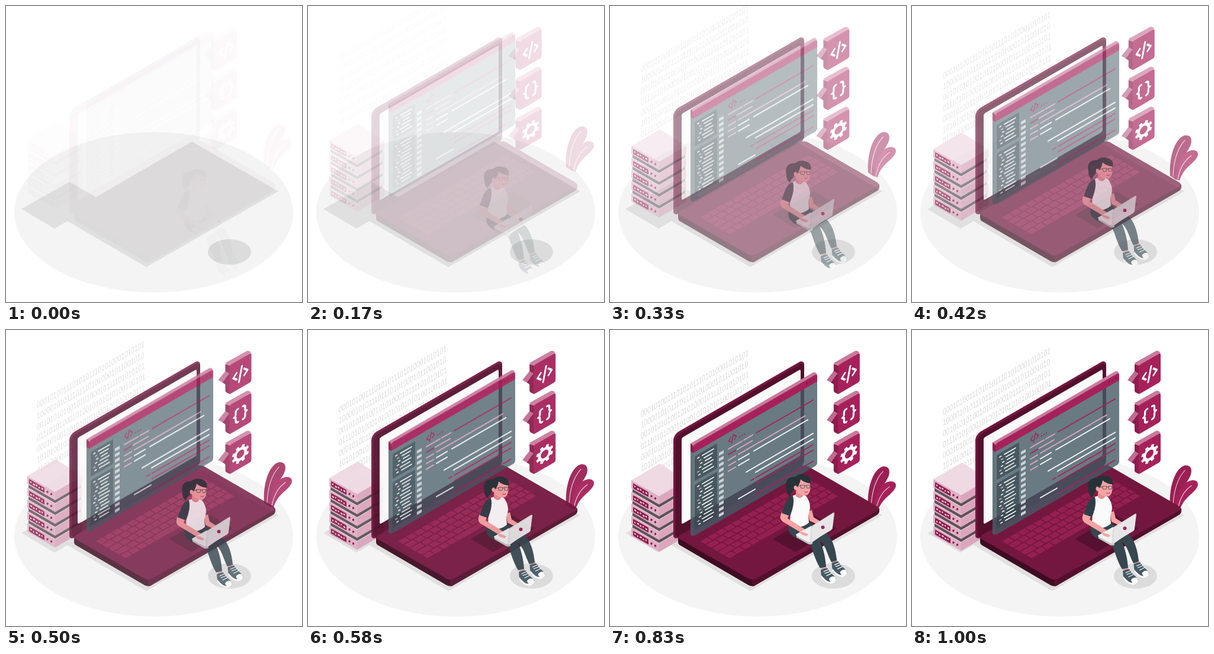
Animation, 500 px wide and 500 px high, one loop 1.04 s. Source, as an HTML page:

```html
<!DOCTYPE html>
<html lang="en">
<head>
<meta charset="utf-8">
<title>Isometric coding scene</title>
<style>
html, body { margin: 0; width: 100%; height: 100%; overflow: hidden; background: #fff; }
svg { display: block; width: 100%; height: 100%; }
text { font: 15px "Liberation Sans", Arial, sans-serif; }
.line { fill: none; stroke-linecap: round; stroke-linejoin: round; }
</style>
</head>
<body>
<svg viewBox="0 0 500 500">
  <ellipse cx="249.5" cy="348.5" rx="235.5" ry="135.5" fill="#f4f4f4"/>
  <path d="M26 343 107 297 163 329 82 376ZM314 229 460 313 237 441 93 357Z" fill="#e0e0e0"/>
  <ellipse cx="377.5" cy="415.5" rx="36.5" ry="21.5" fill="#dcdcdc"/>
  <g id="digits" fill="#d9d9d9"></g>
  <g id="servers"></g>

  <g id="plant">
    <path d="M436 297C434 268 443 235 460 229C470 227 474 234 471 244C466 259 449 270 445 303Z" fill="#9a1f53"/>
    <path d="M444 303C447 281 454 258 472 254C481 253 485 258 482 265C475 278 459 282 452 305Z" fill="#a6215a"/>
    <path d="M441 298C442 272 449 250 461 237M449 303C452 286 460 271 472 263" class="line" stroke="#edd3de" stroke-width="1.1"/>
  </g>

  <g id="laptop">
    <g transform="matrix(1 -.577 0 1 0 0)">
      <rect x="107" y="238.500" width="221" height="179" rx="9" fill="#74173f"/>
      <rect x="110.500" y="243" width="217.500" height="174" rx="8" fill="#53102d"/>
      <rect x="121" y="252" width="201" height="146" rx="3" fill="#fafafa"/>
    </g>
    <path d="M115 350V358Q115 362 119 364L234 431Q240 434 246 431L246 415Z" fill="#3e0c22"/>
    <path d="M240 415V433Q243 433 246 431L450 313Q455 310 455 306V301Z" fill="#53102d"/>
    <path d="M119 346 322 230Q328 227 334 230L450 297Q458 302 450 306L246 420Q240 423 234 420L119 354Q112 350 119 346Z" fill="#74173f"/>
    <path d="M275 353 345 313 383 335 313 375Z" fill="#571130"/>
    <g id="keys" transform="matrix(1 -.573 1 .573 152 357)"></g>
  </g>

  <g id="editor"></g>
  <g id="icons"></g>

  <g id="coder">
    <!-- legs and shoes -->
    <path d="M355 399 364 397 368 411 359 413ZM374 389 383 387 387 401 377 403Z" fill="#f5a3a3"/>
    <path d="M303 329C298 340 304 348 316 354L338 364C343 374 346 390 355 404L365 402C364 385 360 369 354 357C364 364 367 381 374 394L383 391C381 370 376 357 368 347L335 325Z" fill="#37474f"/>
    <g id="shoe">
      <path d="M356 407Q361 404 367 404C371 412 379 416 382 422Q383 428 374 430C366 430 363 422 357 418Z" fill="#455a64"/>
      <path d="M357 416C362 422 366 427 373 427L382 422Q383 428 374 430.500C366 430 360 424 357 419Z" fill="#fff"/>
      <path d="M370 422Q375 416 380 419Q384 424 377 428Q371 428 370 422Z" fill="#fff"/>
      <path d="M361 410 368 407M363 413 371 410M366 417 374 413" class="line" stroke="#fff" stroke-width="1.2"/>
    </g>
    <use href="#shoe" x="18.500" y="-11.500"/>
    <!-- body -->
    <path d="M334 309 341 306 344 318 355 325 352 331 337 324Z" fill="#f5a3a3"/>
    <path d="M307 283Q319 276 331 282C340 294 339 304 335 314L336 327C327 336 313 336 303 331C307 318 301 296 307 283Z" fill="#fafafa"/>
    <path d="M314 274 325 278 326 282Q321 289 314 282Z" fill="#e88f92"/>
    <path d="M290 309 303 313 300 320 335 342 335 349 326 346 291 325Q285 320 290 309Z" fill="#f5a3a3"/>
    <path d="M309 282C300 283 296 294 290 311L304 316C308 306 312 294 309 282Z" fill="#2f3e46"/>
    <!-- head -->
    <path d="M313 250C300 249 295 258 298 269C298 276 300 280 304 283C305 276 313 273 314 264Z" fill="#263238"/>
    <path d="M313 256C319 248 336 250 338 261Q340 277 332 281C323 283 313 276 312 267Z" fill="#f5a3a3"/>
    <path d="M310 266C307 250 317 244 327 246C337 247 341 254 339 261C331 260 325 257 322 254C321 260 319 264 315 270Z" fill="#263238"/>
    <ellipse cx="313.500" cy="268" rx="3" ry="3.500" fill="#f5a3a3"/>
    <path d="M315 266 322 265M322 264h7l-1 5h-5ZM332 264h6l-1 5h-4ZM329 265h3" class="line" stroke="#37474f" stroke-width=".8"/>
    <path d="M329 275.500Q332 277 334 275" class="line" stroke="#a6215a"/>
    <!-- notebook -->
    <path d="M314 347 339 333 376 336 342 360Q338 362 334 360L315 350Z" fill="#f0f0f0"/>
    <path d="M315 350 334 360Q338 362 342 360V363Q338 365 334 363L315 352Z" fill="#c7c7c7"/>
    <path d="M320 342 329 344 335 347 332 350 323 347Z" fill="#f5a3a3"/>
    <path d="M339 337Q339 334 342 332L376 311Q379 309 379 312L376 335Q376 338 373 340L341 359 337 361Z" fill="#dedede"/>
    <path d="M341 337Q341 335 344 333L377 312 376 335Q376 338 373 340L341 359Z" fill="#e6e6e6"/>
    <circle cx="359.500" cy="335" r="3" fill="#a6215a"/>
  </g>
</svg>
<script>
const $ = id => document.getElementById(id);
const accent = '#a6215a', dark = '#8d1c4c', light = '#ca7a9c', pale = '#dba6bd';
const wall = 'matrix(1 -.577 0 1 0 0)';
const shape = (d, fill, alpha = 1) => `<path d="M${d}Z" fill="${fill}" opacity="${alpha}"/>`;
const box = (x, y, w, h, fill, r = 0, alpha = 1) =>
  `<rect x="${x}" y="${y}" width="${w}" height="${h}" rx="${r}" fill="${fill}" opacity="${alpha}"/>`;
const stroke = (d, color, width) =>
  `<path class="line" d="${d}" stroke="${color}" stroke-width="${width}"/>`;

function drawDigits() {
  const rows = [
    '000101001110101011101010001010101',
    '100001010111011101010001011001010',
    '001010101001010100010111101010101',
    '011101010001010010101010100100101',
    '000101001101010101000101010010111',
    '101010010111010101110101000101011',
    '010100001010111010101000101011101'];
  return rows.map((row, i) =>
    `<text transform="matrix(.672 -.388 0 1 52 ${144 + i * 18.4})">${row}</text>`).join('');
}

function drawServers() {
  let out = '';
  for (let i = 4; i >= 0; i--) {
    let slab = shape('36 252 84 224 129 252 83 279', '#efd9e3')
      + shape('36 252 83 279 83 293 36 266', '#dfb0c5')
      + shape('83 279 129 252 129 266 83 293', pale);
    let plate = box(39, 234.5, 26, 8.5, dark, 1);
    for (let k = 0; k < 5; k++)
      plate += box(41 + k * 4.7, 237 + (k + i) % 2, 2 + (k * 2 + i) % 3 * .6, 2.6, '#edd3de');
    slab += `<g transform="matrix(1 .577 0 1 0 0)">${plate}</g>`;
    for (const x of [70, 76.5])
      slab += `<ellipse cx="${x}" cy="${238.5 + x * .577}" rx="1.7" ry="2" fill="${dark}"/>`;
    const spacer = i < 4 ? shape('38 262 83 288 127 262 127 272 83 298 38 272', '#5c5258') : '';
    out += `<g transform="translate(0 ${i * 20})">${spacer}${slab}</g>`;
  }
  return out;
}

function drawKeys() {
  let out = '';
  for (let r = 0; r < 5; r++) {
    const lead = [0, 3, 5, 8, 0][r];
    for (let c = 0; c < 14; c++) {
      const space = r == 4 && c == 4;
      if (r == 4 && c > 4 && c < 9) continue;
      const x = c * 13.2 + (c ? lead : 0);
      const w = Math.min(11.6 + (c ? 0 : lead) + (space ? 52.8 : 0), 184 - x);
      out += box(x, r * 10.3, w, 8.6, '#94204f', 1);
    }
  }
  return out;
}

function drawEditor() {
  const pink = '#e0a9c0', white = '#fff';
  const rule = (x1, x2, y, color, w = 2) => stroke(`M${x1} ${y}H${x2}`, color, w);
  let face = box(141, 274, 209, 154, '#455a64', 4, .8)
    + shape('141 287V278Q141 274 145 274H346Q350 274 350 278V287', accent);
  for (const x of [331, 337, 343]) face += box(x, 278.5, 3.2, 3.6, dark, .5);

  // sidebar lists
  for (const [top, height, count] of [[294, 42, 6], [342, 76, 12]]) {
    face += box(143, top, 38, height, '#37474f', 2, .65);
    for (let i = 0; i < count; i++) {
      const y = top + 6 + i * 5.9, indent = [0, 3, 5, 3, 0, 2][i % 6];
      face += rule(148 + indent, 150.5 + indent, y, i % 3 == 1 ? pink : white, 1.8)
        + rule(156 + indent, 175 - i * 7 % 5, y, white, 1.8);
    }
  }

  // heading
  face += stroke('M204 297 200.500 301 204 305M208.500 294 205.500 308M210 297 213.500 301 210 305', accent, 1.6);
  for (const x of [219, 223, 227]) face += `<circle cx="${x}" cy="305" r="1.1" fill="${accent}"/>`;

  // code: row, from, to, colour
  const rowY = row => 314.5 + row * 9.4;
  const code = [
    [0, 200, 223, pink], [0, 226, 241, pink], [0, 247, 343, accent],
    [1, 200, 212, accent], [1, 215, 240, pink],
    [2, 200, 212, pink], [2, 217, 329, pink],
    [3, 200, 212, pink], [3, 217, 235, white], [3, 243, 334, white],
    [4, 200, 212, pink], [4, 217, 235, white],
    [6, 230, 343, white], [7, 246, 343, white],
    [8, 238, 243, accent], [8, 247, 343, accent], [9, 247, 343, accent],
    [10, 217, 245, white], [11, 247, 343, accent]];
  for (const [row, from, to, color] of code) face += rule(from, to, rowY(row), color);
  for (let i = 0; i < 12; i++) face += box(184, rowY(i) - 2.5, 8, 5, '#cbd1d4');

  return shape('136 190 141 193 141 347 136 344', '#4a5d66', .85)
    + shape('136 190 141 193 141 206 136 203', dark)
    + shape('136 190 343 70Q345 69 347 70L350 73 141 194', light)
    + `<g transform="${wall}">${face}</g>`;
}

function drawIcons() {
  let gear = '<circle r="8.800" fill="none" stroke="#fff" stroke-width="4.600"/>';
  for (let a = 0; a < 360; a += 45)
    gear += `<path d="M-3 -9 -2.300 -14.500H2.300L3 -9Z" fill="#fff" transform="rotate(${a + 22})"/>`;
  const half = stroke('M-4 -11Q-8 -11 -8 -7V-4Q-8 0 -11 0Q-8 0 -8 4V7Q-8 11 -4 11', '#fff', 3.2);
  const signs = [
    stroke('M-6.500 -5.500 -12 0 -6.500 5.500M2.500 -12 -2.500 12M6.500 -5.500 12 0 6.500 5.500', '#fff', 3.2),
    half + `<g transform="scale(-1 1)">${half}</g>`,
    gear];
  return signs.map((sign, i) => `<g transform="translate(0 ${i * 67.5 - 1.5})">`
    + shape('376 59 376 104Q376 106 378 107L384 110 386 62', dark)
    + shape('376 58Q376 57 378 56L412 37Q414 36 416 37L420 39.500 383 62', light)
    + shape('364 86 376 71 383 75 371 90', '#bf6c91')
    + shape('371 90 383 75 383 98', dark)
    + `<g transform="matrix(1 -.577 0 1 401.500 75)">${box(-18.5, -24.5, 37, 49, accent, 3)}`
    + `<g transform="translate(0 1)">${sign}</g></g></g>`).join('');
}

$('digits').innerHTML = drawDigits();
$('servers').innerHTML = drawServers();
$('keys').innerHTML = drawKeys();
$('editor').innerHTML = drawEditor();
$('icons').innerHTML = drawIcons();

// Cubic bezier (.36, -.01, .5, 1.38), solved for time by bisection
const curve = (a, b, s) => 3 * a * s * (1 - s) ** 2 + 3 * b * s * s * (1 - s) + s ** 3;
function ease(t) {
  if (t >= 1) return 1;
  let lo = 0, hi = 1;
  for (let i = 0; i < 24; i++) {
    const mid = (lo + hi) / 2;
    if (curve(.36, .5, mid) < t) lo = mid; else hi = mid;
  }
  return curve(-.01, 1.38, lo);
}

// Starting offset of each part
const slides = {
  digits: [0, -60], servers: [0, -30], plant: [0, -30], laptop: [0, 0],
  editor: [0, -30], icons: [-30, 0], coder: [0, 30]
};
const start = performance.now();
function draw(now) {
  const ms = Math.max(0, now - start) % 1040;
  const step = Math.max(1, Math.floor((ms + 5) * 24 / 1000)); // 24 steps a second
  const p = ease(step / 24 + .04);
  for (const id in slides) {
    const [dx, dy] = slides[id];
    $(id).setAttribute('transform', `translate(${dx * (1 - p)} ${dy * (1 - p)})`);
    $(id).setAttribute('opacity', Math.min(1, Math.max(0, p)));
  }
  requestAnimationFrame(draw);
}
draw(start);
</script>
</body>
</html>
```
